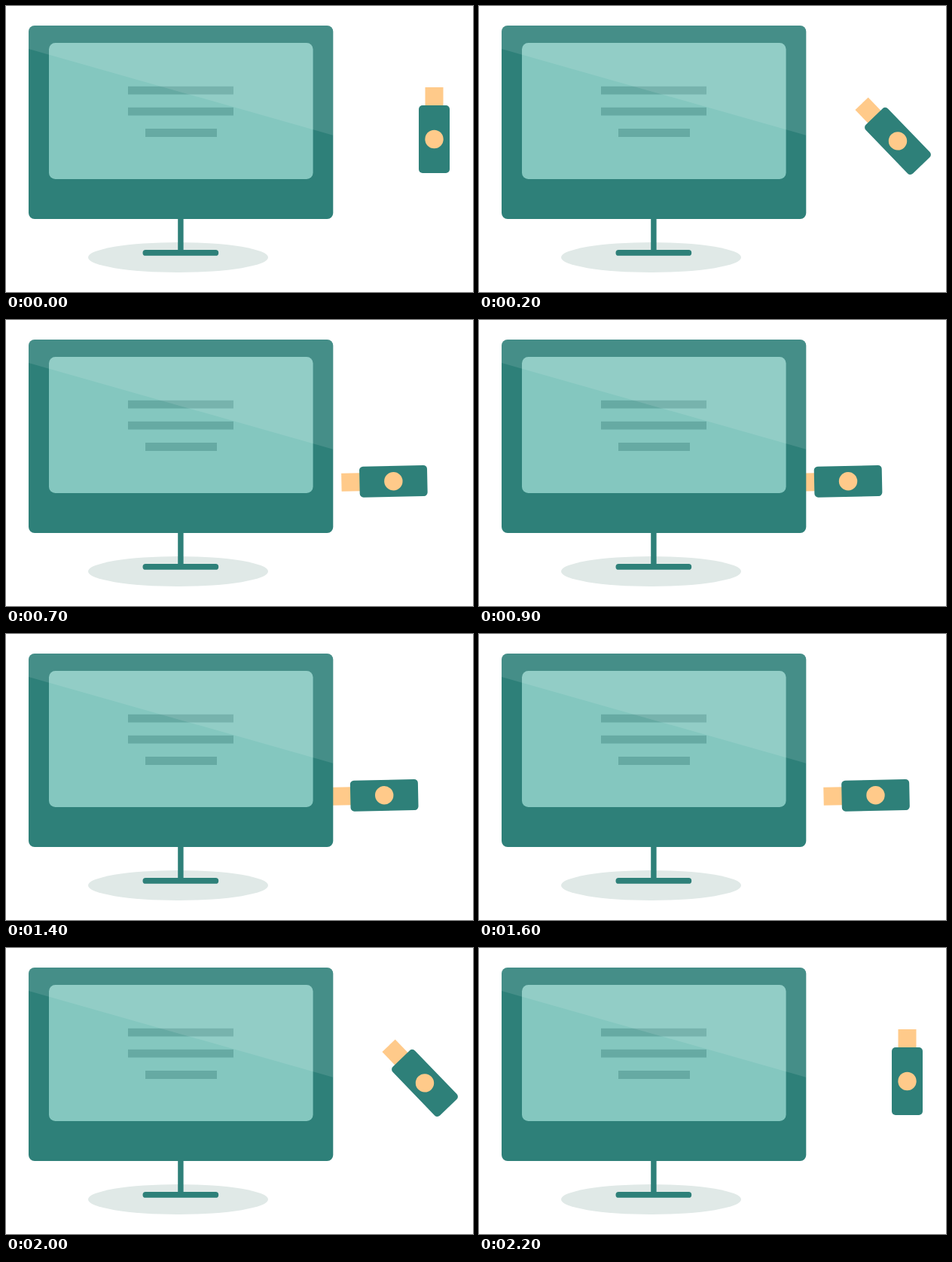
Write an HTML page that moves like this. It is 620x380 px and loops after 4200 ms.

```html
<!DOCTYPE html>
<html lang="en">
<head>
<meta charset="utf-8">
<title>Security key</title>
<style>
  html, body { margin: 0; width: 100%; height: 100%; overflow: hidden; background: #fff; }
  svg { display: block; }
  .teal { fill: #2e8079; }
  .amber { fill: #ffca8a; }
  .line { fill: #66aaa3; }
</style>
</head>
<body>
<svg width="620" height="380" viewBox="0 0 620 380">
  <defs>
    <clipPath id="caseClip"><rect x="30" y="26" width="404.3" height="257" rx="8"/></clipPath>
  </defs>

  <g id="key">
    <rect class="amber" x="-12" y="-69" width="24" height="25"/>
    <rect class="teal" x="-20.5" y="-45" width="41" height="90" rx="5"/>
    <circle class="amber" r="12.2"/>
  </g>

  <ellipse cx="228.5" cy="334" rx="119.5" ry="20" fill="#e0e9e7"/>
  <rect class="teal" x="228.2" y="280" width="7.4" height="48"/>
  <rect class="teal" x="181.5" y="324" width="100.7" height="7.8" rx="3.9"/>

  <g clip-path="url(#caseClip)">
    <rect class="teal" x="30" y="26" width="405" height="257"/>
    <rect x="57" y="49" width="350.6" height="181" rx="8.5" fill="#84c7bf"/>
    <rect class="line" x="162" y="106.8" width="140" height="10.7"/>
    <rect class="line" x="162" y="134.8" width="140" height="10.7"/>
    <rect class="line" x="185" y="163" width="95" height="11"/>
    <path d="M30 26H435V172L30 57Z" fill="#fff" opacity=".11"/>
  </g>
</svg>
<script>
  const LOOP = 4200, STEP = 100, LAST = 9, RETURN = 22;
  const key = document.getElementById('key');

  // Swing towards the port: x, y, angle for each step
  const swing = [
    [568.5, 177, 0],
    [564.5, 176, -22],
    [556, 179.4, -44],
    [546.4, 188.5, -66],
    [543.4, 197.1, -86.1],
    [535, 205.7, -88.7],
    [526.5, 214.3, -91.2]
  ];

  // After the swing the key slides straight in
  function pose(step) {
    const end = swing.length - 1;
    if (step <= end) return swing[step];
    const [x, y, angle] = swing[end];
    return [x - 12.15 * (step - end), y, angle];
  }

  function draw(time) {
    const tick = Math.floor((time % LOOP) / STEP);
    // In, hold, then the same way back out
    const step = Math.max(0, Math.min(tick, LAST, RETURN - tick));
    const [x, y, angle] = pose(step);
    key.setAttribute('transform', `translate(${x} ${y}) rotate(${angle})`);
  }

  const start = performance.now();
  function frame() {
    draw(performance.now() - start);
    requestAnimationFrame(frame);
  }
  frame();
</script>
</body>
</html>
```
